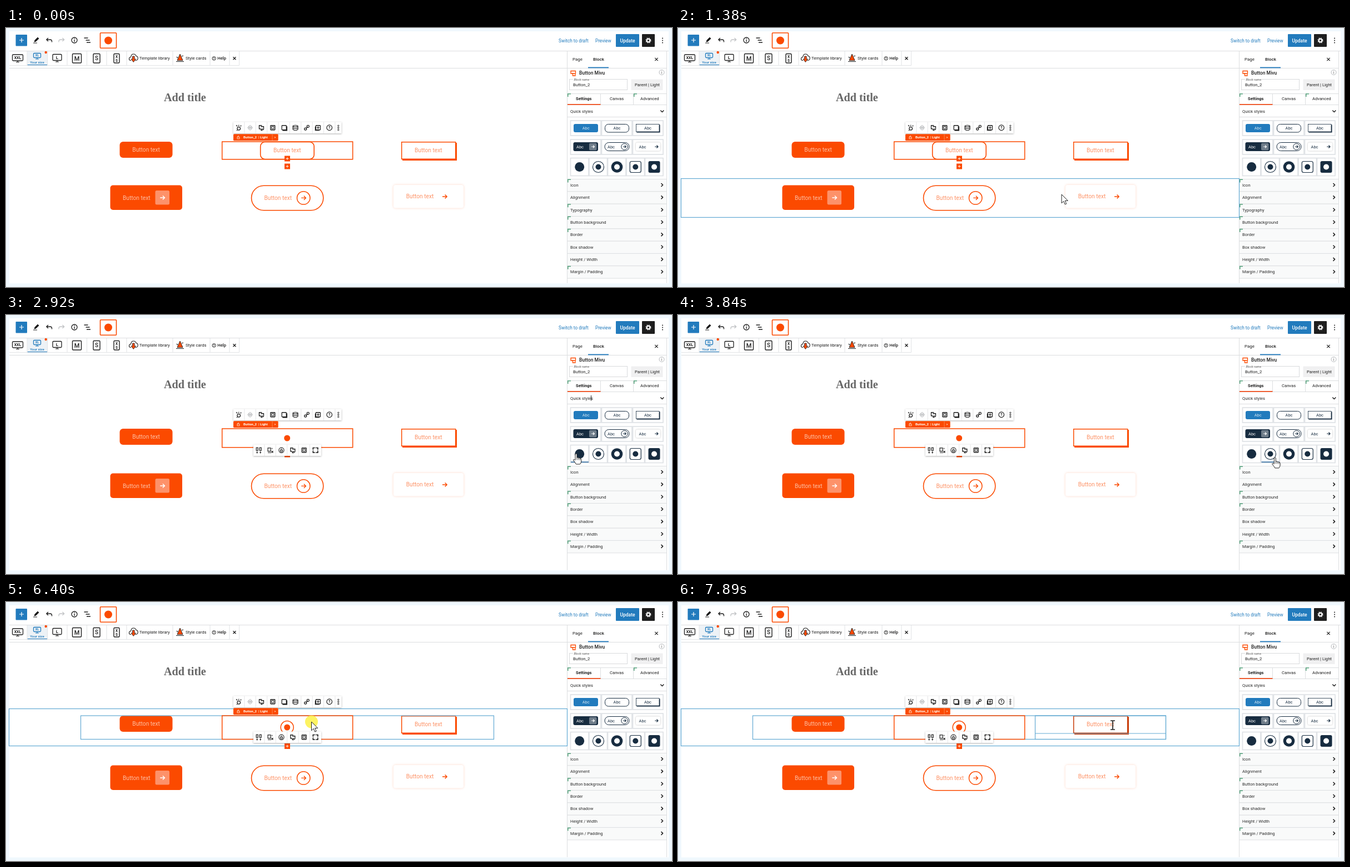
An HTML page for the animation above (8 s loop, 1198 by 467 pixels).

```html
<!DOCTYPE html>
<html lang="en">
<head>
<meta charset="utf-8">
<title>Button block editor</title>
<style>
html, body { margin: 0; width: 100%; height: 100%; overflow: hidden; background: #f0f8fd; }
svg { display: block; width: 100%; height: 100%; font-family: Roboto, Arial, sans-serif; }
text { white-space: pre; }
.soft { filter: drop-shadow(0 1px 1.5px rgba(0,0,0,.3)); }
.glow { filter: drop-shadow(0 0 2px rgba(251,74,0,.22)); }
</style>
</head>
<body>
<svg id="stage" viewBox="0 0 1198 467" xmlns="http://www.w3.org/2000/svg"></svg>
<script>
const ORANGE = '#fb4a00', PEACH = '#fd9266', BLUE = '#227bbd', LINE = '#62a9d3',
      INK = '#1e1e1e', NAVY = '#172c40', GRID = '#dcdee0', GREEN = '#55a27c';
const LOOP = 8000, STEP = 76.67, START = 280;

const rect = (x, y, w, h, fill, more = '') =>
  `<rect x="${x}" y="${y}" width="${w}" height="${h}" fill="${fill}" ${more}/>`;
const frame = (x, y, w, h, stroke, sw = 1, more = '') =>
  rect(x, y, w, h, 'none', `stroke="${stroke}" stroke-width="${sw}" ${more}`);
const dot = (x, y, r, fill, more = '') => `<circle cx="${x}" cy="${y}" r="${r}" fill="${fill}" ${more}/>`;
const ring = (x, y, r, stroke, sw = 1) => dot(x, y, r, 'none', `stroke="${stroke}" stroke-width="${sw}"`);
const path = (d, stroke = INK, sw = 1.3, more = 'fill="none"') =>
  `<path d="${d}" stroke="${stroke}" stroke-width="${sw}" ${more}/>`;
const text = (x, y, s, size, fill = INK, more = '') =>
  `<text x="${x}" y="${y}" font-size="${size}" fill="${fill}" ${more}>${s}</text>`;
const at = (x, y, body) => `<g transform="translate(${x} ${y})">${body}</g>`;
const group = (id, body) => `<g id="${id}">${body}</g>`;
const bold = 'font-weight="500"', mid = 'text-anchor="middle"';

const arrow = (x, y, c, k = 1) =>
  at(x, y, path(`M${-4 * k} 0H${4 * k}M${.6 * k} ${-3.6 * k}L${4.2 * k} 0L${.6 * k} ${3.6 * k}`, c, 1.4 * Math.sqrt(k)));
const chevron = (x, y) => path(`M${x - 1.5} ${y - 3}l3 3l-3 3`, INK, 1.5);
const plus = y => rect(501, y - 5, 10, 10, ORANGE) + path(`M503.5 ${y}h5M506 ${y - 2.5}v5`, '#fff', .9);
const corner = (x, y) => path(`M${x + .8} ${y + 6}V${y + .8}H${x + 6}`, GREEN, 1.5);

function header() {
  return rect(6, 6, 1186, 454.5, '#fff') +
    path('M6 41.5H1192', GRID, 1) + path('M6 72.5H1009', GRID, 1) +
    rect(17.5, 12, 20.5, 20.5, BLUE, 'rx="1"') + path('M24 22h8M28 18v8', '#fff', 1.2) +
    path('M51 25l1-3l5-5l2 2l-5 5zM49 27h7', INK, 1, `fill="${INK}"`) +
    path('M82.5 25.5v-1.5q0-3-3-3h-6M76 18l-3.2 3l3.2 3') +
    path('M95 25.5v-1.5q0-3 3-3h6M101.500 18l3.200 3l-3.200 3', '#c2c4c6') +
    ring(123, 22, 5, INK, 1.3) + path('M123 21v4M123 18.6v1.3') +
    path('M140.500 18h7M143.500 22h7M145 26h7') +
    frame(169.5, 8.8, 29, 27.500, ORANGE, 1.6, 'rx="1"') + dot(184, 22.500, 7, ORANGE) +
    text(994, 26, 'Switch to draft', 8.3, BLUE) + text(1060, 26, 'Preview', 8.2, BLUE) +
    rect(1097, 11, 42, 23, BLUE, 'rx="1"') + text(1118, 25.700, 'Update', 8.5, '#fff', bold + mid.replace('t', ' t')) +
    rect(1144, 11, 23, 23, INK, 'rx="1"') + ring(1155.500, 22.500, 2.8, '#fff', 2) +
    dot(1155.500, 22.500, 4.300, 'none', 'stroke="#fff" stroke-width="1.500" stroke-dasharray="1.700 1.677"') +
    [18.500, 22.500, 26.500].map(y => dot(1181, y, 1, INK)).join('');
}

function sizeBar() {
  const monitor = (x, y, w, h, s, c, fs) => frame(x - w / 2, y - h / 2, w, h, c, 1.3, 'rx="1.5"') +
    path(`M${x} ${y + h / 2}v2.500M${x - 3} ${y + h / 2 + 2.500}h6`, c, 1.2) +
    text(x, y + fs * .36, s, fs, c, `${mid} font-weight="700"`);
  const pad = (x, w, s, fs) => frame(x - w / 2, 46.500, w, 16.500, INK, 1.4, 'rx="1.500"') +
    text(x, 54.800 + fs * .36, s, fs, INK, `${mid} ${bold}`);
  return rect(38.500, 42, 36, 25, '#edf2f6') + rect(38.500, 66, 36, 1.800, BLUE) +
    path('M6 67.500H419.500V42', '#e2e4e6', 1) +
    [38, 74.500, 110, 145.500, 181, 217, 300, 367, 402].map(x => path(`M${x} 42v25`, '#e0e2e4', 1)).join('') +
    monitor(21, 53.500, 19, 11, 'XXL', INK, 7) + monitor(56, 49.500, 13, 8, 'XL', BLUE, 5.500) +
    text(56, 63.500, 'Your size', 6.2, BLUE, `${mid} ${bold}`) + dot(71.700, 44, 2.2, ORANGE) +
    monitor(92, 53, 16, 11, 'L', INK, 8) + pad(127.500, 16, 'M', 11) + pad(163, 12, 'S', 10) +
    frame(194, 46.500, 10, 16.500, INK, 1.4, 'rx="1.500"') +
    `<text transform="translate(201.500 54.800) rotate(90)" font-size="7.500" ${mid} font-weight="700" y="2.500" x="0"></text>` +
    text(199, 54, 'X', 6.500, INK, `${mid} font-weight="700"`) + text(199, 61, 'S', 6.500, INK, `${mid} font-weight="700"`) +
    path('M225 58.500h-1q-3-.5-2.500-3.500q.5-2.500 3.200-2.700q.3-5.300 4.800-5.300q3.500 0 4.500 3.500q3.500.5 3.200 4.300q-.4 3.300-3.700 3.700h-1', INK, 1.1) +
    path('M227.500 51v5h-2.500l4.300 5.500l4.300-5.500h-2.500v-5z', INK, .8, `fill="${ORANGE}"`) +
    text(240, 57.300, 'Template library', 7.65) +
    path('M313 47l5 11.500h-10z', INK, .9, `fill="${ORANGE}"`) + path('M306 60.500h14M309 54l-2-2M316 51l3-1', INK, 1.2) +
    text(323, 57.300, 'Style cards', 7.65) +
    ring(374.200, 54.800, 3.200, INK, 1) + text(374.200, 56.800, '?', 5.500, INK, mid + ' font-weight="700"') +
    text(380.300, 57.300, 'Help', 7.65, INK, bold) + path('M408.500 52.300l5 5m0-5l-5 5', INK, 1.3);
}

function tiles() {
  const cell = (x, y, w, h) => frame(x, y, w, h, '#dfe2e6', 1.700);
  const abc = (x, y, c = NAVY) => text(x, y, 'Abc', 7.5, c);
  let s = '';
  for (const y of [167, 201]) for (let i = 0; i < 3; i++) s += cell(1015.500 + i * 56, y, 54.500, 27);
  for (let i = 0; i < 5; i++) s += cell(1015.500 + i * 33.500, 234.500, 32.500, 32);
  s += rect(1021, 173, 44, 15, BLUE, 'rx="3"') + abc(1036.700, 183.300, '#d5e6f3') +
    frame(1077.500, 173.500, 43, 14.500, NAVY, 1, 'rx="6"') + abc(1092.500, 183.300) +
    rect(1134.500, 174.500, 42, 14, NAVY) + rect(1133.500, 173.500, 41.500, 13.500, '#fff', `stroke="${NAVY}" stroke-width=".8"`) +
    abc(1148, 183) +
    rect(1020.500, 206, 44.500, 16, NAVY, 'rx="3"') + abc(1026, 217, '#fff') +
    rect(1049, 207.500, 13.500, 13, '#6f7d8a', 'rx="2"') + arrow(1055.700, 214, '#fff', .65) +
    frame(1077, 206.500, 44, 15, NAVY, 1, 'rx="7.500"') + abc(1082, 217) +
    ring(1112.500, 214, 5.700, NAVY, 1) + arrow(1112.500, 214, NAVY, .65) +
    rect(1133, 206.500, 44, 15, '#fff', 'rx="3" style="filter:drop-shadow(0 0 1.500px rgba(0,0,0,.25))"') +
    abc(1138.500, 217) + arrow(1170, 214, NAVY, .7);
  const y = 250.500;
  return s + dot(1031.700, y, 8.500, NAVY) +
    ring(1065.500, y, 10, NAVY, 1.1) + dot(1065.500, y, 5, NAVY) +
    dot(1099, y, 10.300, NAVY) + dot(1099, y, 5, '#fff') +
    frame(1122.300, 240.500, 20, 20, NAVY, 1.2, 'rx="3"') + dot(1132.300, y, 5, NAVY) +
    rect(1155.500, 240, 21, 21, NAVY, 'rx="3"') + dot(1166, y, 5, '#fff');
}

function list(names, marked) {
  return names.map((n, i) => {
    const y = 272.500 + i * 22.350;
    return rect(1010, y, 178, 22.350, '#f9fafa') + path(`M1010 ${y}h178M1010 ${y + 22.350}h178`, GRID, .9) +
      text(1015, y + 13.400, n, 7.65, '#2b2b2b') + chevron(1180, y + 10.500) + (marked.includes(n) ? corner(1010, y) : '');
  }).join('');
}

function panel() {
  const names = ['Icon', 'Alignment', 'Typography', 'Button background', 'Border', 'Box shadow', 'Height / Width', 'Margin / Padding'];
  const marked = ['Icon', 'Typography', 'Button background', 'Border', 'Margin / Padding'];
  return path('M1009.500 42V460M1188.500 42V460', GRID, 1) +
    text(1019, 59.300, 'Page', 7.9) + text(1056, 59.300, 'Block', 7.9, INK, bold) +
    path('M1010 72.500h178', GRID, 1) + rect(1047, 70.500, 37, 1.800, BLUE) +
    path('M1167.300 53.800l5.400 5.400m0-5.400l-5.400 5.400', INK, 1.2) +
    path('M1016 77.500h8.500v4.500h-8.500zM1019.500 81v5h4.500v-3', ORANGE, 1.3) +
    text(1031, 84, 'Button Mivu', 8.600, INK, bold) +
    ring(1179.500, 80, 4.500, '#a4a8ac', .8) + path('M1179.500 79.300v3.200M1179.500 77.300v1', '#777', .9) +
    frame(1013.500, 92.500, 104, 19, '#d8dadc', 1) + rect(1020, 90, 30, 5, '#fff') +
    text(1021.500, 94.800, 'Block name', 5.500, '#555', 'font-style="italic"') + text(1020, 104.500, 'Button_2', 7.65) +
    rect(1124.500, 92.500, 57, 19.500, '#f0f0f1') + text(1131, 104.800, 'Parent | Light', 7.65) +
    path('M1010 118.500h178M1010 138.500h178M1069.500 118v20M1128.500 118v20', GRID, 1) +
    rect(1010, 137, 59.500, 1.800, '#f0501e') + corner(1010, 118) + corner(1129, 118) +
    text(1025, 130.300, 'Settings', 7.6, INK, 'font-weight="700"') + text(1086, 130.300, 'Canvas', 7.65) +
    text(1141, 130.300, 'Advanced', 7.65) +
    text(1015, 152.500, 'Quick styles', 7.65, '#2b2b2b') + path('M1177.300 148.500l3 3l3-3', INK, 1.500) +
    path('M1010 160.500h178', GRID, 1) + tiles() +
    group('list0', list(names, marked)) +
    group('list1', list(names.filter(n => n !== 'Typography'), marked)) +
    group('hover', rect(1016, 264.300, 32, 1.700, '#3f77a8')) +
    group('caret', rect(1052, 145, 1, 9.500, INK));
}

function rows() {
  const label = (x, y, c = PEACH) => text(x, y, 'Button text', 10.2, c);
  return text(284, 132, 'Add title', 20.2, '#666', 'font-weight="700" font-family="Liberation Serif, Times New Roman, serif"') +
    rect(204.500, 205, 95, 29, ORANGE, 'rx="6"') + label(227.300, 223, '#fdc0a5') +
    group('third', rect(713, 207, 98, 32, 'currentColor') +
      rect(711.700, 205.700, 97, 30.500, '#fff', 'stroke="currentColor" stroke-width="1.500"') + label(735, 224)) +
    group('lower', rect(187.500, 283.500, 129.500, 44.500, ORANGE, 'rx="5"') + label(210, 309.500, '#fdc0a5') +
      rect(268.500, 293, 25.500, 25.500, '#fd926a', 'rx="2.500"') + arrow(281.300, 306, '#fff') +
      frame(441.500, 284.300, 129.300, 44.400, ORANGE, 1.600, 'rx="22.200"') + label(464.500, 310) +
      ring(535.200, 306.400, 11.700, ORANGE, 1.500) + arrow(535.200, 306.400, ORANGE) +
      rect(697, 283, 126, 41.500, '#fff', 'rx="4" class="glow"') + label(719.700, 307) + arrow(789, 304, ORANGE));
}

function selection() {
  const box = b => frame(388.700, 205, 235, b - 205, ORANGE, 1.500);
  return group('sel0', box(236.800) + frame(457.700, 205.500, 96.500, 31, ORANGE, 1.600, 'rx="8"') +
      text(481, 224, 'Button text', 10.2, PEACH) + plus(235.500) + plus(249.500)) +
    group('sel1', box(238.800) + dot(505.700, 222, 5.500, ORANGE) + plus(251.500)) +
    group('sel2', box(247.500) + ring(505.700, 226, 11.500, ORANGE, 1.500) + dot(505.700, 226, 5.500, ORANGE) + plus(260));
}

function toolbars() {
  const square = frame(-4, -4, 8, 8, INK, 1.300, 'rx=".8"');
  const inner = square + frame(-2, -2, 4, 4, INK, 1);
  const swap = path('M1-4h-5v6h3M-1-2h5v4q0 2-3 2M2 1.500l-3 2.500l2 1.500', INK, 1.300);
  const icons = [
    ring(0, 1.500, 2.800, INK, 1.300) + path('M-4.500-4.500l2 2M0-5v2M4.500-4l-1.500 1.500M-4 5l2-1', INK, 1.300),
    path('M-3.500-1.500L0-4.500l3.500 3zM-3.500 1.500L0 4.500l3.500-3zM-5 0h10', '#b5b7b9', 1),
    swap, inner,
    square + path('M-2.500 5h7.500v-7.500', INK, 1.600),
    path('M-4.500-3v6q4.500 3.500 9 0v-6q-4.500-3-9 0q4.500 3 9 0M-4.500 0q4.500 3 9 0', INK, 1.200),
    ring(-2.300, 2.300, 2, INK, 1.300) + ring(2.300, -2.300, 2, INK, 1.300) + path('M-1.500 1.500l3-3'),
    square + path('M-5-2v7h7M-2.500 0h5M0-2.500v5', INK, 1.200),
    ring(0, 0, 4.800, INK, 1.200) + text(0, 2.500, '?', 7, INK, mid + ' font-weight="700"')
  ];
  const small = [
    frame(-4.500, -4.500, 3, 5, INK, 1.200) + frame(1.500, -4.500, 3, 5, INK, 1.200) + path('M-3 2v4M3 2v4M-4.500 4h3M1.500 4h3', INK, 1),
    frame(-4, -4, 5, 6, INK, 1.200) + path('M-4 4.500h6M3.500-4v2M2.500 1.500l3 3m0-3l-3 3', INK, 1.100),
    ring(0, 0, 4.600, INK, 1.100) + path('M-2 0h4v2.500h-4zM-1.300 0v-1.500q1.300-1.700 2.600 0v1.500', INK, 1),
    swap, inner,
    frame(-4.300, -4.300, 8.600, 8.600, INK, 1.600, 'stroke-dasharray="5.600 3" stroke-dashoffset="2.800"') + frame(-4.300, -4.300, 8.600, 8.600, INK, .7)
  ];
  const bar = (x, y, w, h, set, n) => rect(x, y, w, h, '#fff', 'class="soft"') +
    set.map((ic, i) => at(x + 9.700 + i * 20.380, y + h / 2, ic) +
      (i < n ? path(`M${x + 19.900 + i * 20.380} ${y}v${h}`, '#e2e3e5', .9) : '')).join('');
  return bar(409, 169.500, 194.500, 20.500, icons, 9) +
    [176.300, 180, 183.700].map(y => ring(597.800, y, 1.200, INK, .9)).join('') +
    rect(409, 191.300, 80.700, 12, ORANGE, 'rx="1.500"') + path('M479 191.500v11.500', '#fd9266', .8) +
    frame(416, 196.500, 4, 3.300, '#ffd5c4', .9) + path('M417 196.500v-1.500q1-1.300 2 0', '#ffd5c4', .9) +
    text(427, 199.400, 'Button_2  | Light', 6, '#fff', 'font-weight="700"') + text(482.500, 199.400, '&gt;', 5.500, '#fff', bold) +
    group('minibar', bar(445, 233.500, 122, 20.500, small, 5));
}

function outlines() {
  return group('row1', frame(5.500, 192.500, 1004, 56, LINE, 1.200)) +
    group('row2', frame(5.500, 271.500, 1004, 70, LINE, 1.200)) +
    group('cols', frame(134.500, 205, 743, 42.500, LINE, 1.200)) +
    group('col3', frame(642.500, 205, 235, 42.500, LINE, 1.200) + path('M642.500 237h235', LINE, 1.200));
}

const pointers =
  group('arrow', path('M0 0V15.800L3.700 12.300L6.200 18L8.700 17L6.200 11.400H11.300Z', '#222', 1, 'fill="#fff" stroke-linejoin="round"')) +
  group('hand', path('M-1.500 1Q0-1 1.500 1V7.500Q3.300 6 4.300 8Q6 7 7 8.800Q9 8 9.300 10.500V14Q9 17 7 19H0Q-1.500 16-5 12Q-5.500 9.500-1.500 11.500Z', '#222', 1, 'fill="#fff" stroke-linejoin="round"') +
    path('M1.500 7.500v4M4.300 8v3.500M7 8.800v3', '#222', .8)) +
  group('beam', path('M-4-8H4M-4 8H4M0-8V8', '#222', 1.700));

const stage = document.getElementById('stage');
stage.innerHTML = header() + sizeBar() + panel() + rows() + outlines() + selection() + toolbars() +
  group('halo', dot(0, 0, 11.500, '#fdf03f', 'opacity=".82"')) + group('pointer', pointers);

const el = id => document.getElementById(id);
const show = (id, on) => { el(id).style.display = on ? '' : 'none'; };
const move = (id, x, y) => el(id).setAttribute('transform', `translate(${x} ${y})`);
const within = (v, a, b) => v >= a && v < b;

// time, x, y of the pointer tip
const track = [
  [280, 1168, 440], [510, 800, 300], [735, 514, 225], [1040, 600, 258], [1190, 690, 300], [1370, 690, 300],
  [1580, 1025.5, 250], [3300, 1025.5, 250], [3500, 1067, 256], [3670, 1067, 256], [3800, 1074, 257],
  [3960, 1070, 255], [5580, 1070, 255], [5930, 549.5, 216], [6770, 549.5, 216], [7150, 740, 226],
  [7560, 872, 238], [7630, 872, 238], [7860, 782, 222], [8000, 782, 222]
];
const clicks = [[2160, 2290], [4160, 4220], [6400, 6570]];
const carets = [[2920, 3450], [3920, 4220], [4850, 5410], [5940, 6400]];

function locate(t) {
  const i = Math.max(1, track.findIndex(k => k[0] > t));
  const [a, b] = [track[i - 1], track[i]];
  const p = Math.max(0, Math.min(1, (t - a[0]) / (b[0] - a[0])));
  return [a[1] + (b[1] - a[1]) * p, a[2] + (b[2] - a[2]) * p];
}

function draw(t) {
  const state = t < 2920 ? 0 : t < 4850 ? 1 : 2, drop = [0, 2, 11][state];
  const [x, y] = locate(START + Math.floor((t - START) / STEP + .01) * STEP);
  const inPage = t >= START && x < 1010;
  const inRow1 = inPage && within(y, 192, 249 + drop);
  const overThird = inRow1 && within(x, 711, 811) && y < 239;
  const beam = overThird && within(x, 733, 788) && within(y, 213, 229);

  for (const s of [0, 1, 2]) show('sel' + s, s === state);
  show('list0', !state);
  show('list1', state);
  show('minibar', state);
  move('lower', 0, drop);

  show('row1', inRow1);
  el('row1').firstChild.setAttribute('height', 56 + drop);
  show('row2', inPage && within(y, 272, 342));
  show('cols', inRow1 && state === 2);
  show('col3', inRow1 && state === 2 && within(x, 642, 878));
  el('third').style.color = overThird ? '#c73b08' : ORANGE;

  const tile = Math.floor((x - 1015) / 33.5);
  show('hover', t >= START && within(tile, 0, 5) && within(y, 234, 268));
  move('hover', tile * 33.5, 0);
  show('caret', carets.some(c => within(t, ...c)));

  show('halo', clicks.some(c => within(t, ...c)));
  move('halo', x, y);
  show('pointer', t >= START);
  move('pointer', x, y);
  show('arrow', inPage && !beam);
  show('hand', !inPage);
  show('beam', beam);
}

function tick() {
  draw(performance.now() % LOOP);
  requestAnimationFrame(tick);
}
tick();
</script>
</body>
</html>
```
